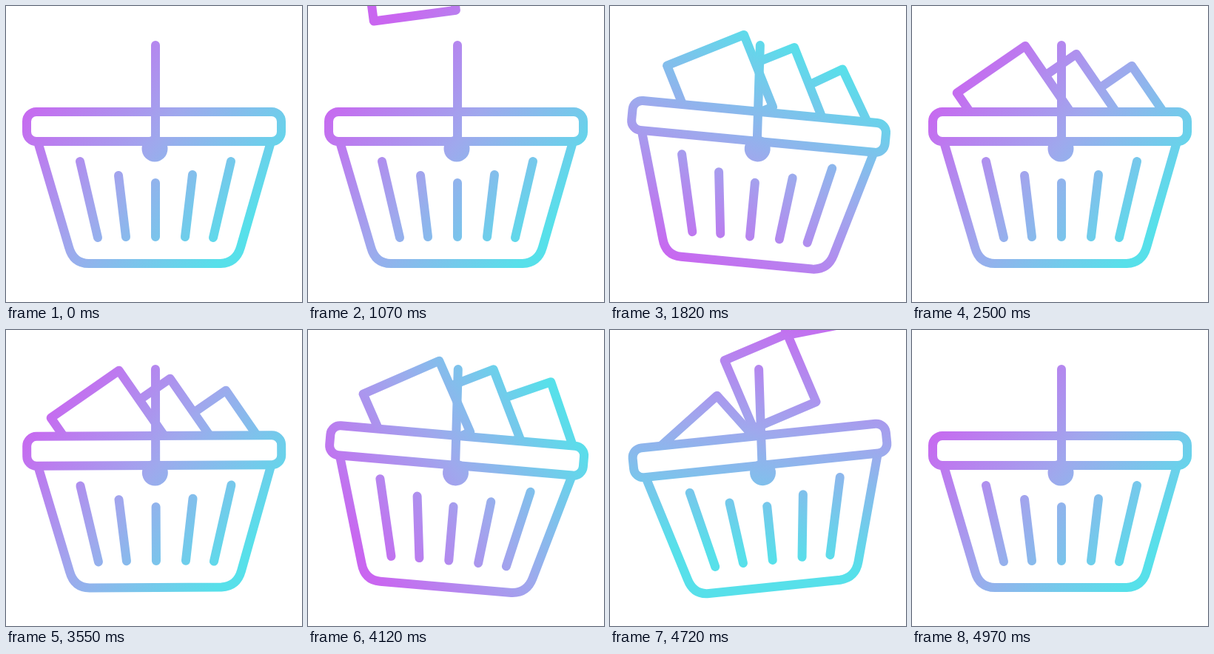
An HTML page for the animation above (5.05 s loop, 400 by 400 pixels).

```html
<!DOCTYPE html>
<html lang="en">
<head>
<meta charset="utf-8">
<title>Shopping basket</title>
<style>
  html, body { margin: 0; width: 100%; height: 100%; overflow: hidden; background: #fff; }
  svg { display: block; width: 100%; height: 100%; }
</style>
</head>
<body>
<svg viewBox="0 0 400 400">
  <defs>
    <linearGradient id="hue" gradientUnits="userSpaceOnUse" x1="62" y1="85" x2="325" y2="300">
      <stop offset="0" stop-color="#c966f0"/>
      <stop offset=".5" stop-color="#9fa8ed"/>
      <stop offset="1" stop-color="#57e0ea"/>
    </linearGradient>
    <!-- White shows the gradient, black covers what lies behind -->
    <mask id="ink" maskUnits="userSpaceOnUse" x="0" y="0" width="400" height="400">
      <g fill="#000" stroke="#fff" stroke-width="12" stroke-linecap="round" stroke-linejoin="round">
        <g id="basket">
          <g id="items"></g>
          <path d="M44 187L85 326Q91 348 112 348H290Q311 347 317 326L357 187"/>
          <rect x="28" y="143" width="344" height="40" rx="13"/>
          <path d="M100 210L124 313M152 229L162 312M202 239V312M252 228L242 312M304 210L280 313"/>
          <circle cx="201" cy="193" r="17.5" fill="#fff" stroke="none"/>
        </g>
        <path id="handle" d="M202 53V188"/>
      </g>
    </mask>
  </defs>
  <rect width="400" height="400" fill="url(#hue)" mask="url(#ink)"/>
</svg>
<script>
const LOOP = 5050, START = 1070, REST = 2500, MIRROR = 6025;
const FALL = 1.2; // px per ms
const $ = id => document.getElementById(id);
const clamp = v => Math.max(0, Math.min(1, v));

// x, y: resting place of the top right corner; land: time it reaches the basket
const items = [
  { x: 297, y: 81, w: 88, h: 102, land: 1453, bounce: 98, slide: .24 },
  { x: 222, y: 65, w: 92, h: 100, land: 1350, bounce: 67, slide: 0 },
  { x: 153, y: 54, w: 112, h: 105, land: 1198, bounce: 54, slide: -.1 }
];

for (const item of items) {
  item.el = document.createElementNS('http://www.w3.org/2000/svg', 'path');
  item.el.setAttribute('d', `M0 0H${-item.w}V${item.h}H0Z`);
  $('items').append(item.el);
}

// Three damped half swings that end at REST
function swing(t, from, damping) {
  const q = clamp((t - from) / (REST - from));
  return Math.exp(-damping * q) * Math.sin(3 * Math.PI * q);
}

function spin(t) {
  const p = clamp((t - START) / 1110);
  return 180 * (p + p * p * (3 - 2 * p));
}

function place({ el, x, y, land, bounce, slide }, t) {
  const rise = t < land ? (land - t) * FALL : -bounce * swing(t, land, 3);
  const dx = rise > 0 ? 33 * (1 - Math.exp(-rise / 20)) : -rise * slide;
  const turn = rise > 0 ? dx * .4 + rise * .09 : dx * .5;
  el.setAttribute('transform', `translate(${x + dx} ${y - rise}) rotate(${turn - 34.5})`);
}

function draw(time) {
  // Items fall in, rest, then everything plays backwards
  const t = Math.min(time, MIRROR - time, REST);
  const tilt = -19.7 * swing(t, 1260, 2.63);
  const shift = 2.3 * Math.sin(Math.PI * clamp((t - START) / (REST - START)));
  $('hue').setAttribute('gradientTransform', `rotate(${spin(t)} 255 190)`);
  $('basket').setAttribute('transform', `translate(${shift} 0) rotate(${tilt} 200 150)`);
  $('handle').setAttribute('transform', `rotate(${tilt / 3} 202 80)`);
  $('items').setAttribute('display', t < START ? 'none' : 'inline');
  for (const item of items) place(item, t);
}

const begin = performance.now();
function tick() {
  draw((performance.now() - begin) % LOOP);
  requestAnimationFrame(tick);
}
tick();
</script>
</body>
</html>
```
